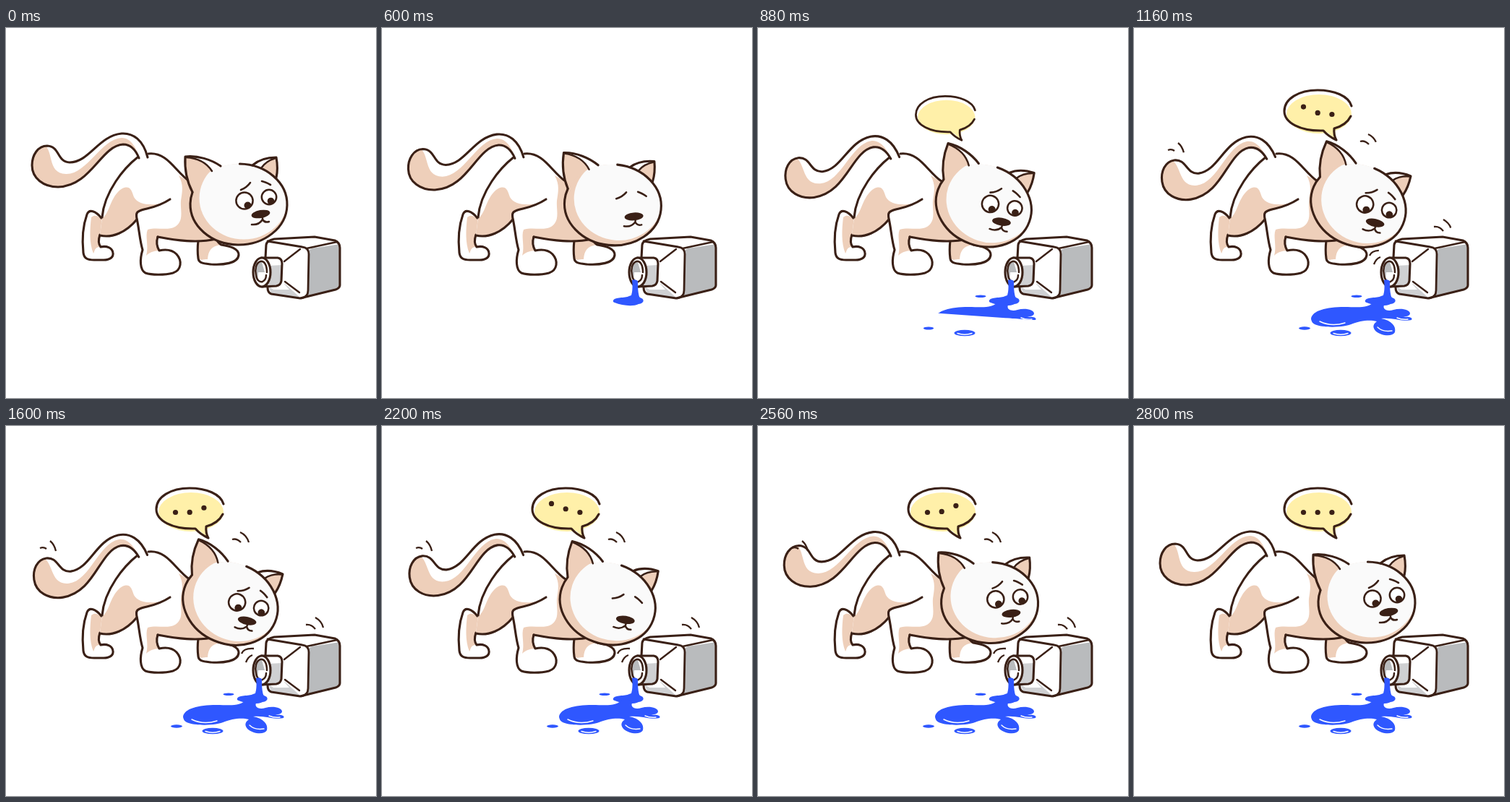
These frames come from a looping animation (512 by 512 pixels, 2880 ms). An HTML page with a canvas:

```html
<!DOCTYPE html>
<html lang="en">
<head>
<meta charset="utf-8">
<title>Cat and spilled bottle</title>
<style>
html, body { margin: 0; width: 100%; height: 100%; overflow: hidden; background: #fff; }
canvas { display: block; width: 512px; height: 512px; }
</style>
</head>
<body>
<canvas id="stage" width="512" height="512"></canvas>
<script>
const ctx = document.getElementById('stage').getContext('2d');
const LOOP = 2880, STEP = 40;
const LINE = '#3a2016', PEACH = '#eecfba', WHITE = '#fff', FACE = '#fafafa';
const GRAY = '#b9bbbd', PALE = '#cfd0d2', BLUE = '#2f57ff', YELLOW = '#fff0a9';

const clamp = v => Math.max(0, Math.min(1, v));
const ramp = (t, a, b) => clamp((t - a) / (b - a));
const smooth = u => u * u * (3 - 2 * u);
const easeQuad = u => u < 0.5 ? 2 * u * u : 1 - 2 * (1 - u) * (1 - u);

function fill(d, color) {
  ctx.fillStyle = color;
  ctx.fill(typeof d === 'string' ? new Path2D(d) : d);
}
function stroke(d, width = 3.1, color = LINE) {
  ctx.strokeStyle = color;
  ctx.lineWidth = width;
  ctx.stroke(typeof d === 'string' ? new Path2D(d) : d);
}
function oval(x, y, rx, ry = rx, turn = 0, from = 0, to = Math.PI * 2) {
  const p = new Path2D();
  p.ellipse(x, y, rx, ry, turn, from, to);
  return p;
}
function scoped(draw) {
  ctx.save();
  draw();
  ctx.restore();
}
function spin(x, y, degrees) {
  ctx.translate(x, y);
  ctx.rotate(degrees * Math.PI / 180);
  ctx.translate(-x, -y);
}
function scaleAbout(x, y, sx, sy = sx) {
  ctx.translate(x, y);
  ctx.scale(sx, sy);
  ctx.translate(-x, -y);
}

const farHindLeg = 'M132 263 C124 253 115 250 112 258 C107 272 105 292 107 311 C108 319 113 321 122 321 L135 321 C144 321 149 317 148 311 C147 304 139 301 131 303 C127 298 128 292 130 286';
const farForeLeg = 'M266 294 C265 303 265 312 266 319 C267 326 275 326 284 327 C300 328 321 326 322 314 C322 305 310 302 298 300 C294 298 293 296 291 292';
const torso = 'M183 178 C164 193 136 226 133 262 L130 287 C147 291 166 283 181 265 L190 307 L211 307 L210 289 C236 294 264 298 291 292 L275 225 L254 212 C239 202 228 176 197 174 Z';
const nearLeg = 'M181 258 C183 273 186 292 189 307 C185 320 185 335 193 339 C201 342 220 342 231 339 C243 335 244 322 236 313 C230 307 221 306 212 308 C208 301 208 295 210 289 L240 250 L205 248 Z';

function drawBody() {
  fill(farHindLeg, WHITE);
  fill('M118 262 C124 257 129 262 133 264 L132 287 C128 292 128 298 131 303 C123 302 123 308 121 312 C115 298 116 278 118 262 Z', PEACH);
  stroke(farHindLeg);

  fill(farForeLeg, WHITE);
  fill('M266 294 L291 292 L297 300 C284 302 280 308 279 320 C274 320 269 322 267 319 Z', PEACH);
  stroke(farForeLeg);

  fill(torso, WHITE);
  fill(nearLeg, WHITE);
  fill('M133 263 C143 259 144 232 161 222 C172 217 174 225 177 234 C184 247 209 246 224 240 C208 249 189 250 182 256 C180 260 184 262 181 266 C167 284 147 291 130 287 Z', PEACH);
  fill('M239 204 L257 215 L290 291 C260 297 236 293 210 289 C208 296 209 302 213 308 C204 308 198 311 194 315 C198 302 192 288 196 279 C209 275 223 281 234 275 C247 267 241 252 242 239 C244 226 246 217 239 204 Z', PEACH);

  stroke('M182 179 C164 193 136 226 133 262');
  stroke('M197 174 C224 171 235 200 254 212');
  stroke('M130 287 C147 291 166 283 181 265');
  stroke('M210 289 C236 294 264 298 291 292');
  stroke('M227 237 C207 250 194 249 185 253 C180 255 180 258 181 264 C184 276 185 294 189 307 C185 320 185 335 193 339 C201 342 220 342 231 339 C243 335 244 322 236 313 C230 307 221 306 212 308 C208 301 208 295 210 289');
}

function drawTail(pose) {
  const tail = new Path2D('M196 179 C190 155 176 145 160 146 C128 149 115 186 88 186 C70 185 75 164 57 163 C44 163 36 176 36 190 C36 208 52 220 72 220 C118 219 131 163 162 161 C173 161 180 170 184 180');
  scoped(() => {
    spin(192, 182, -8.4 * pose);
    fill(tail, WHITE);
    scoped(() => {
      ctx.clip(tail);
      fill('M50 160 C68 167 55 201 83 202 C112 203 132 153 160 152 C174 152 181 168 185 181 L170 240 L20 240 L20 160 Z', PEACH);
    });
    stroke(tail);
  });
}

function drawEye(x, y, r, px, py, pr, open) {
  if (open < 0.08) return;
  scoped(() => {
    scaleAbout(x, y, 1, open);
    const eye = oval(x, y, r);
    fill(eye, WHITE);
    scoped(() => {
      ctx.clip(eye);
      fill(oval(px, py, pr), LINE);
    });
    stroke(eye, 2.5);
  });
}

function drawHead(pose, blink) {
  const skull = oval(322, 244, 67, 56);
  scoped(() => {
    spin(312, 215, 22 * pose);

    const leftEar = 'M258 227 C250 212 247 195 248 178 C265 176 284 182 297 191';
    fill(leftEar + ' L286 215 Z', WHITE);
    fill('M258 227 C250 212 247 195 248 178 C266 180 278 187 285 199 L285 225 Z', PEACH);
    const rightEar = 'M341 190 C350 182 362 179 374 179 C376 190 376 198 374 207';
    fill(rightEar + ' Z', WHITE);
    fill('M374 179 C364 183 358 189 354 196 L374 207 C376 198 376 190 374 179 Z', PEACH);

    scoped(() => {
      ctx.clip(skull);
      fill(skull, PEACH);
      fill(oval(329, 235.5, 61.5, 57), FACE);
    });
    stroke(leftEar);
    stroke('M249 179 C266 180 278 187 285 198', 2.5);
    stroke(rightEar);
    stroke('M373 180 C363 183 357 188 353 194', 2.5);
    stroke(oval(322, 244, 67, 56, 0, -1.55, 3.44));

    drawEye(330, 239, 11.6, 334.5, 245.5, 5, 1 - blink);
    drawEye(364, 234, 10.2, 366.5, 239.5, 4.8, 1 - blink);
    scoped(() => {
      ctx.translate(blink, 11 * blink);
      stroke('M325 224 Q333 221 338 214', 2.6);
      stroke('M354 212 Q359 213 366 217', 2.6);
    });

    fill(oval(352.5, 257.5, 13, 5.5, -0.17), LINE);
    stroke('M355 260 L355 265 Q350 273 340 272 M355 265 Q358 270 364 268', 2.5);
  });
}

function drawBottle() {
  const front = 'M360 300 Q360 294 367 296 L410 303 Q419 304 419 313 L418 363 Q418 373 407 374 L367 368 Q362 366 362 359 Z';
  fill('M360 300 Q361 293 372 292 L427 289 L455 294 Q462 297 462 304 L462 356 Q462 360 456 362 L407 374 L362 366 Z', WHITE);
  fill('M419 309 Q421 304 430 304 L462 299 L462 356 Q462 360 456 362 L414 373 Q418 370 418 363 Z', GRAY);
  fill(front, WHITE);
  fill('M363 357 L386 354 L407 373 L367 367 Z', PALE);
  fill('M363 357 L384 353 L392 362 L370 362 Z', WHITE);
  stroke('M359 318 L360 300 Q361 294 371 292 L427 289 L455 294 Q462 297 462 304 L462 356 Q462 360 456 362 L407 374 L367 368 Q362 366 362 359');
  stroke('M362 295 L410 303 Q419 304 419 313 L418 363 Q418 372 409 374 M416 305 L458 296', 2.8);
  stroke('M385 323 L407 306 M386 351 L406 366', 2.4);

  const neck = 'M353 318 L376 318 Q382 319 382 326 L381 350 Q380 356 374 357 L354 358 Z';
  fill(neck, WHITE);
  fill('M363 329 L381 328 L381 350 Q380 356 374 357 L360 357 Z', PALE);
  stroke(neck);
  const rim = oval(354, 338, 12, 20);
  fill(rim, WHITE);
  stroke(rim);
  const mouth = oval(353, 337, 8, 14);
  fill(mouth, WHITE);
  scoped(() => {
    ctx.clip(mouth);
    fill('M344 320 L354 324 L358 338 L349 338 L348 352 L340 350 Z', GRAY);
  });
  stroke('M361 338 C361 327 357 322 352 323 C346 325 344 334 346 342 C347 350 352 352 355 351 C359 349 360 346 360 342', 2.5);
}

function drawDrop(x, y, rx, ry, grow) {
  if (grow > 0) fill(oval(x, y, rx * grow, ry * grow), BLUE);
}

const gleam = d => stroke(d, 1.4, WHITE);

function drawSpill(t) {
  const pour = ramp(t, 350, 500), splash = smooth(ramp(t, 460, 600));
  const flood = ramp(t, 620, 1120);
  scoped(() => {
    ctx.beginPath();
    ctx.rect(300, 345, 100, 38 * pour);
    ctx.clip();
    fill('M346 349 Q350 347 354 350 C354 358 354 367 357 375 L343 375 C347 367 347 358 346 349 Z', BLUE);
  });
  if (splash > 0) scoped(() => {
    scaleAbout(345, 376, splash);
    fill('M320 377 C322 372 336 374 342 371 C346 369 355 369 357 373 C364 375 363 381 355 382 C347 386 332 384 322 380 Q319 379 320 377 Z', BLUE);
  });
  if (flood > 0) scoped(() => {
    const edge = 380 + 24 * flood + 24 * flood * flood;
    ctx.beginPath();
    ctx.moveTo(225, 365);
    ctx.lineTo(395, 365);
    ctx.lineTo(395, edge + 6);
    ctx.lineTo(225, edge - 6);
    ctx.clip();
    fill('M245 402 C247 391 266 386 291 386 C309 386 324 389 333 378 L348 380 C341 389 350 393 359 390 C370 387 382 390 382 395 C382 399 375 399 372 400 C382 399 386 401 384 404 C373 407 357 400 342 402 C357 405 363 413 361 421 C357 428 342 426 334 419 C329 413 332 409 336 406 C325 403 311 406 303 409 C291 415 260 415 250 410 Q245 407 245 402 Z', BLUE);
    gleam('M257 406 Q273 414 292 408 M337 414 Q344 421 357 419 M364 401 Q371 404 379 403');
  });
  drawDrop(308, 371.3, 7.5, 1.8, smooth(ramp(t, 660, 840)));
  drawDrop(236, 415.5, 8, 2.2, smooth(ramp(t, 720, 920)));
  const dropSize = smooth(ramp(t, 700, 880));
  drawDrop(286, 422, 14.5, 4.3, dropSize);
  if (dropSize === 1) gleam('M276 422.5 Q286 426 296 422.5');
}

const dotLift = (t, start) => Math.sin(Math.PI * ramp(t, start, start + 520)) ** 2;

function drawBubble(t) {
  const rise = smooth(ramp(t, 720, 960)), settle = smooth(ramp(t, 960, 1120));
  const size = 1.19 * rise - 0.19 * settle;
  if (size <= 0) return;
  scoped(() => {
    scaleAbout(296, 157, size);
    fill(oval(256, 119, 45, 27), YELLOW);
    fill('M261 138 L280 156 L277 134 Z', YELLOW);
    stroke('M301 108 C297 94 277 86 254 86 C228 86 208 98 208 115 C208 131 230 143 262 142 Q269 150 280 155 Q276 148 277 139 C288 136 296 130 300 122');
    const radius = 3.6 * smooth(ramp(t, 880, 1000));
    for (let i = 0; i < 3; i++) {
      const lift = dotLift(t, 970 + 120 * i) + dotLift(t, 1970 + 120 * i);
      fill(oval(234.5 + 19.7 * i, 119.5 - 12.5 * lift, radius), LINE);
    }
  });
}

const marks = [
  'M47 169 Q52 167 56 170', 'M61 159 Q67 164 69 173',
  'M313 157 Q319 155 325 161', 'M324 147 Q333 151 336 161',
  'M415 275 Q423 274 428 281', 'M428 265 Q437 270 439 279',
  'M326 315 Q329 307 343 308', 'M332 327 Q335 319 341 317'
];

function drawMarks(t) {
  const shown = ramp(t, 1060, 1200), gone = ramp(t, 2580, 2740);
  if (shown === 0 || gone === 1) return;
  const length = 22;
  scoped(() => {
    ctx.lineCap = 'butt';
    ctx.setLineDash([length * (shown - gone), 60]);
    ctx.lineDashOffset = -length * gone;
    for (const mark of marks) stroke(mark, 2.3);
  });
}

const blinkAt = (t, start) =>
  smooth(ramp(t, start, start + 80)) - smooth(ramp(t, start + 190, start + 270));

function draw(t) {
  const pose = easeQuad(ramp(t, 350, 1090)) - easeQuad(ramp(t, 1990, 2750));
  const blink = blinkAt(t, 480) + blinkAt(t, 2080);
  ctx.fillStyle = WHITE;
  ctx.fillRect(0, 0, 512, 512);
  ctx.lineCap = ctx.lineJoin = 'round';
  drawBody();
  drawTail(pose);
  drawBottle();
  drawSpill(t);
  drawBubble(t);
  drawHead(pose, blink);
  drawMarks(t);
}

const began = performance.now();
function tick() {
  const t = (performance.now() - began) % LOOP;
  draw(Math.floor(t / STEP) * STEP);
  requestAnimationFrame(tick);
}
tick();
</script>
</body>
</html>
```
